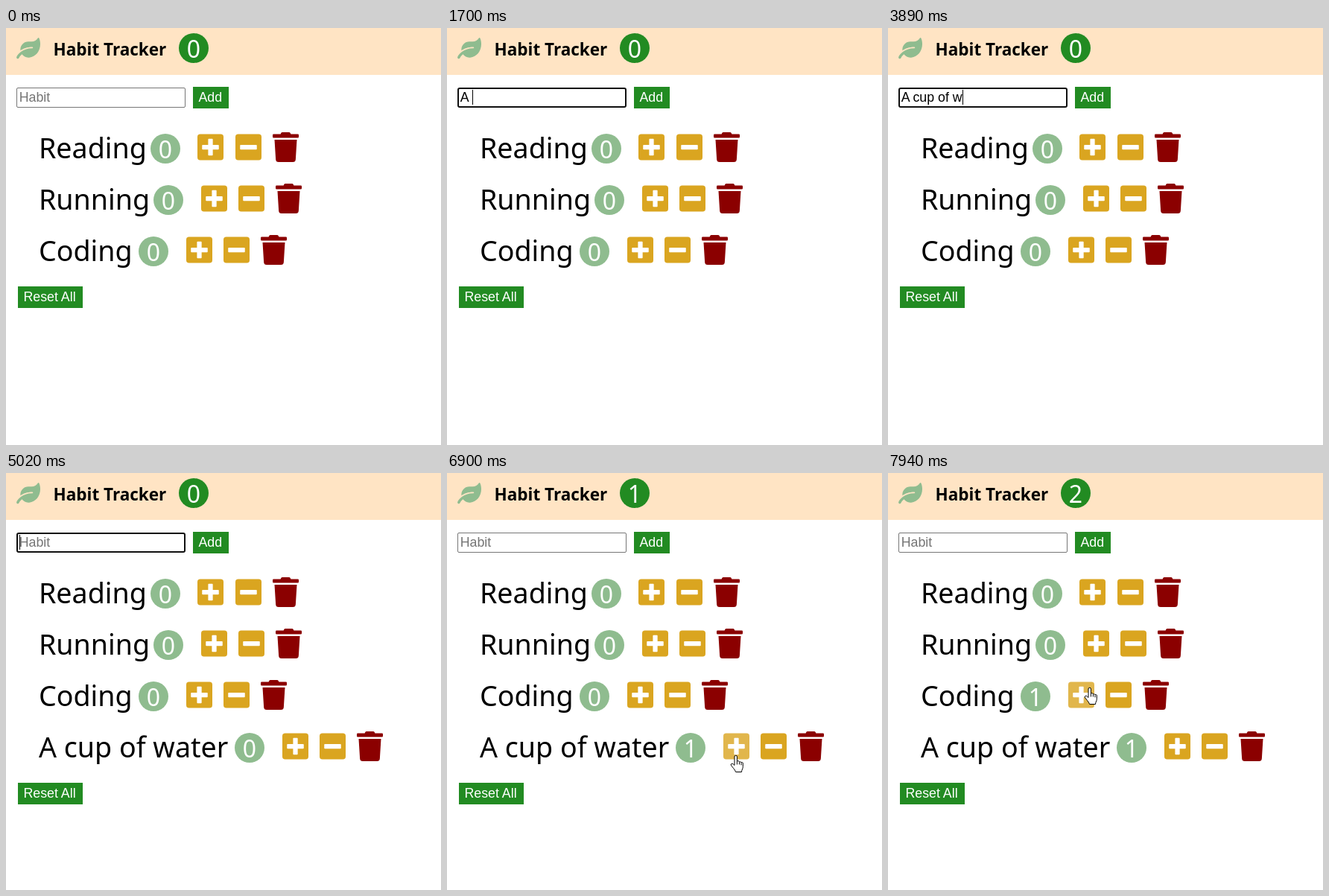
Recreate the animation shown at these times as an HTML page. Size 584 by 560 pixels, loop 8 s.

```html
<!DOCTYPE html>
<html lang="en">
<head>
<meta charset="utf-8">
<title>Habit Tracker</title>
<style>
  html, body { margin: 0; width: 100%; height: 100%; overflow: hidden; background: #fff; }
  svg { display: block; }
  text { font: 17.78px "Liberation Sans", Arial, sans-serif; white-space: pre; }
  .title { font: bold 22.5px "Noto Sans", sans-serif; }
  .habit { font: 37.6px "Noto Sans", sans-serif; }
  .count { font: 32px "Noto Sans", sans-serif; fill: #fff; text-anchor: middle; }
</style>
</head>
<body>
<svg width="584" height="560" viewBox="0 0 584 560">
  <defs>
    <path id="leaf" d="M546 10c-6-13-22-13-28-1C487 62 431 96 368 96h-80C182 96 96 182 96 288c0 7 1 14 1.500 20.500C161 263 253 224 384 224a16 16 0 0 1 0 32C133 256 26 410 2.400 468a32 32 0 0 0 59 24c2-4 21-48 72-90 32 44 94 86 175 77C465 467 576 327 576 154c0-50-11-102-30-144z"/>
    <g id="minus">
      <rect y="2.500" width="35" height="35" rx="3.750" fill="#daa520"/>
      <rect x="6.250" y="16.900" width="22.500" height="6.250" rx=".9" fill="#fff"/>
    </g>
    <g id="plus">
      <use href="#minus"/>
      <rect x="14.400" y="8.750" width="6.250" height="22.500" rx=".9" fill="#fff"/>
    </g>
    <path id="trash" transform="scale(.078125)" fill="#8b0000" d="M432 32H312l-9-19A24 24 0 0 0 281 0H167a24 24 0 0 0-22 13L136 32H16A16 16 0 0 0 0 48v32a16 16 0 0 0 16 16h416a16 16 0 0 0 16-16V48a16 16 0 0 0-16-16zM53 467a48 48 0 0 0 48 45h246a48 48 0 0 0 48-45L416 128H32z"/>
    <path id="arrow" fill="#fff" stroke="#000" d="M.5.5v16l3.700-3.500 2.500 5.500 2.400-1-2.500-5.500h5z"/>
    <path id="beam" fill="none" stroke="#000" d="M-3-7.500h2.500l1 1 1-1H4M.5-6.500v13M-3 7.500h2.500l1-1 1 1H4"/>
    <g id="hand" transform="translate(-8.500 -1.500)" stroke="#000" stroke-linejoin="round">
      <path fill="#fff" d="M6 14V2.500a1.700 1.700 0 0 1 3.400 0V9a1.600 1.600 0 0 1 3 .8 1.500 1.500 0 0 1 2.600.7 1.300 1.300 0 0 1 2.300 1V16c0 3-1.800 4-1.800 7H7.600C7 20 2 15.500 1.200 13.600.8 11.800 3 11 4.300 12.500z"/>
      <path fill="none" d="M9.400 9v4M12.400 10v3M15 10.800v3"/>
    </g>
  </defs>
  <rect width="584" height="63" fill="#ffe4c4"/>
  <use href="#leaf" transform="translate(14 13) scale(.0556)" fill="#8fbc8f"/>
  <text class="title" x="63.500" y="37">Habit Tracker</text>
  <g id="scene"></g>
</svg>
<script>
const LOOP = 8000, FRAME = 70;
const FOCUS = 1030, ENTER = 5020, BLUR = 6830, FIRST_CLICK = 6900, SECOND_CLICK = 7870;
const TYPED = 'A cup of water';
const KEYS = [1240, 1700, 2490, 2560, 2820, 3170, 3300, 3430, 3560, 3890, 4090, 4350, 4550, 4620];
const ROWS = [ // label, badge centre, first icon
  ['Reading', 214, 257.4], ['Running', 218, 261.8], ['Coding', 198, 241.8], [TYPED, 327, 370.8]
];
const MOUSE = [ // time, x, y
  [70, 481, 444], [550, 124, 124], [749, 124, 124], [750, 126, 102],
  [6140, 126, 102], [6490, 498, 437], [6760, 388.5, 380], [7030, 388.5, 380],
  [7240, 306, 307], [7440, 306, 307], [7580, 271, 304], [7730, 271, 304], [7800, 271.5, 289]
];
const scene = document.getElementById('scene');
const pen = document.createElement('canvas').getContext('2d');
pen.font = '17.78px "Liberation Sans", Arial, sans-serif';

const box = (x, y, w, h, attrs) => `<rect x="${x}" y="${y}" width="${w}" height="${h}" ${attrs}/>`;
const text = (x, y, s, attrs = '') => `<text x="${x}" y="${y}" ${attrs}>${s}</text>`;
const button = (x, y, w, s) => box(x, y, w, 29, 'fill="#228b22"') + text(x + 7.5, y + 20, s, 'fill="#fff"');
const badge = (x, y, n, color) =>
  `<circle cx="${x}" cy="${y}" r="20" fill="${color}"/>` + text(x, y + 12.7, n, 'class="count"');
const inside = (p, x, y, w, h) => p && p.x >= x && p.x <= x + w && p.y >= y && p.y <= y + h;

function mouseAt(t) {
  if (t < 70 || (t >= 1240 && t < 6140)) return null;
  const i = MOUSE.findLastIndex(k => k[0] <= t);
  const [t0, x0, y0] = MOUSE[i], [t1, x1, y1] = MOUSE[i + 1] || [LOOP, x0, y0];
  const p = Math.floor((t - t0) / FRAME) * FRAME / (t1 - t0);
  const ease = p * p * (3 - 2 * p);
  return { x: x0 + (x1 - x0) * ease, y: y0 + (y1 - y0) * ease };
}

function field(t) {
  const focused = t >= FOCUS && t < BLUR;
  const typed = t < ENTER ? TYPED.slice(0, KEYS.filter(k => k <= t).length) : '';
  const lastEdit = [FOCUS, ...KEYS, ENTER, 5150].findLast(k => k <= t);
  let out = focused
    ? box(15, 81, 225, 25, 'rx="2" fill="#fff" stroke="#101010" stroke-width="2"')
    : box(14.5, 80.5, 226, 26, 'rx="1.5" fill="#fff" stroke="#767676"');
  out += typed ? text(17.7, 99, typed) : text(17.7, 99, 'Habit', 'fill="#757575"');
  if (focused && Math.floor((t - lastEdit) / 530) % 2 === 0)
    out += box(Math.floor(18 + pen.measureText(typed).width), 83, 1, 20, 'fill="#000"');
  return out;
}

function row([label, badgeX, iconX], i, count, mouse) {
  const y = 140 + 69 * i;
  let hover = false;
  const icons = ['plus', 'minus', 'trash'].map((name, k) => {
    const x = Math.round(iconX + 50.2 * k), over = inside(mouse, x, y, 35, 40);
    hover ||= over;
    return `<use href="#${name}" x="${x}" y="${y}" ${over ? 'opacity=".8"' : ''}/>`;
  }).join('');
  return { hover, svg: text(44, y + 35, label, 'class="habit"') + badge(badgeX, y + 22, count, '#8fbc8f') + icons };
}

function render(t) {
  const mouse = mouseAt(t);
  const water = +(t >= FIRST_CLICK), coding = +(t >= SECOND_CLICK);
  const rows = ROWS.slice(0, t < ENTER ? 3 : 4).map((r, i) => row(r, i, [0, 0, coding, water][i], mouse));
  const resetY = 140 + 69 * rows.length;
  let out = badge(252, 27, water + coding, '#228b22') + field(t) + button(251, 79, 48, 'Add')
    + rows.map(r => r.svg).join('') + button(16, resetY, 87, 'Reset All');
  if (mouse) {
    const hand = rows.some(r => r.hover) || inside(mouse, 251, 79, 48, 29) || inside(mouse, 16, resetY, 87, 29);
    const cursor = hand ? 'hand' : inside(mouse, 14, 80, 227, 27) ? 'beam' : 'arrow';
    out += `<use href="#${cursor}" x="${mouse.x}" y="${mouse.y}"/>`;
  }
  return out;
}

let shown = '';
function tick() {
  const next = render(performance.now() % LOOP);
  if (next !== shown) scene.innerHTML = shown = next;
  requestAnimationFrame(tick);
}
tick();
</script>
</body>
</html>
```
